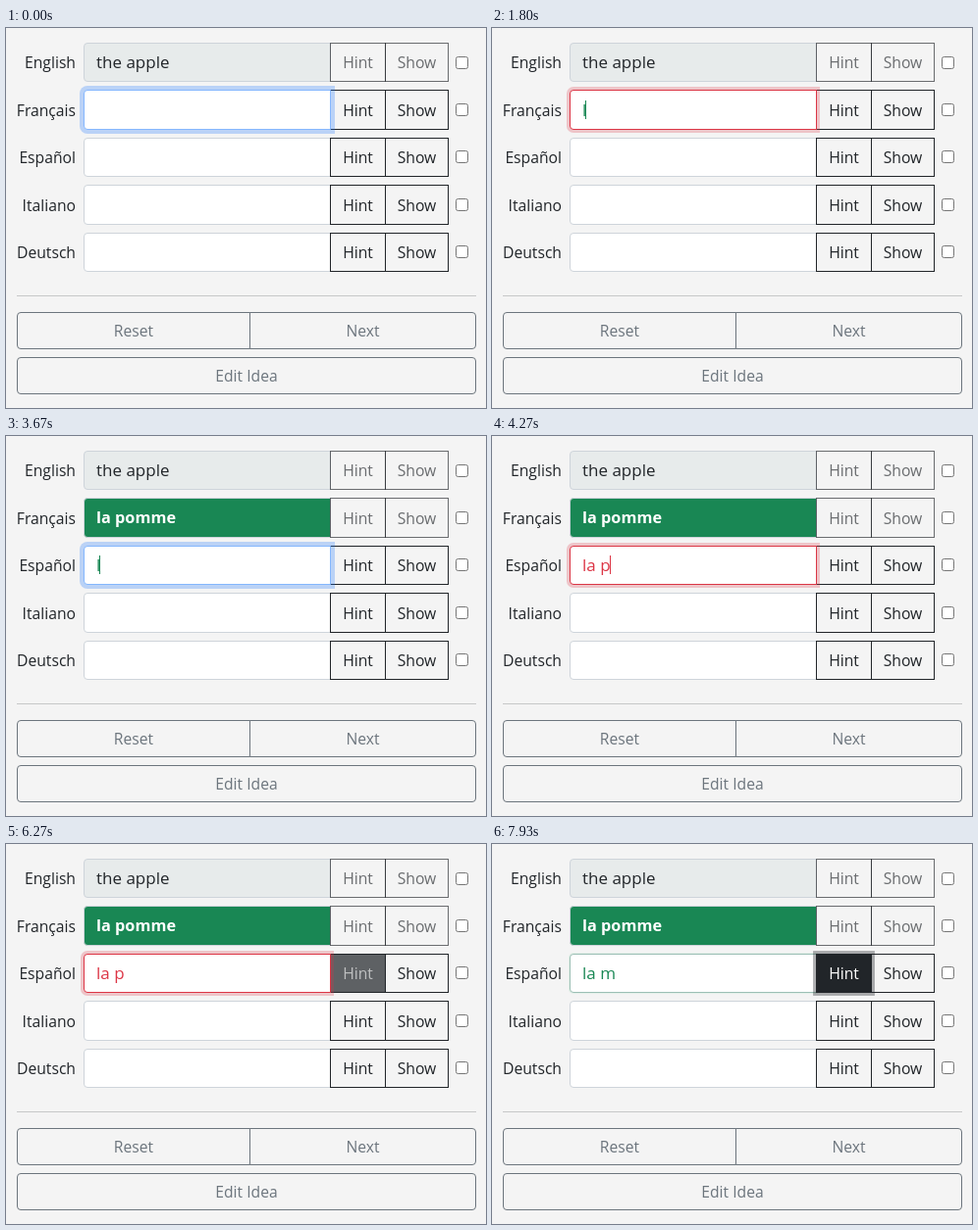
Recreate the animation shown at these times as an HTML page. Size 489 by 388 pixels, loop 8 s.

```html
<!DOCTYPE html>
<html lang="en">
<head>
<meta charset="utf-8">
<title>Vocabulary quiz</title>
<style>
html, body { margin: 0; width: 100%; height: 100%; overflow: hidden; background: #f4f4f4; }
body { position: relative; font: 15.7px "Open Sans", "Noto Sans", sans-serif; color: #212529; }
div { position: absolute; box-sizing: border-box; display: flex; align-items: center; white-space: pre; }
.label { justify-content: flex-end; }
.input { border: 1px solid #ced4da; border-radius: 4px 0 0 4px; background: #fff; padding: 0 0 1px 12px; font-size: 17px; }
.given { background: #e7ebeb; }
.done { background: #198754; color: #fff !important; font-weight: 700; font-size: 16.3px; }
.btn { border: 1px solid #212529; justify-content: center; z-index: 1; }
.off { opacity: .65; }
.grey { border-color: #6c757d; color: #6c757d; }
.check { border: 1px solid #767676; border-radius: 2.5px; background: #fff; }
.line { background: #c6c7c8; }
.caret { position: static; width: 1px; height: 19px; margin-left: -1px; background: currentColor; }
</style>
</head>
<body>
<script>
const LOOP = 8000, FADE = 150, BLINK = 600;
const DARK = [33, 37, 41], GREY = [108, 117, 125], WHITE = [255, 255, 255];
const GREEN = [25, 135, 84], RED = [220, 53, 69];

// Field looks: border, ring colour, ring width
const LOOKS = {
  idle:  { border: [206, 212, 218], width: 0 },
  blue:  { border: [134, 183, 254], ring: [13, 110, 253, .25], width: 4 },
  green: { border: GREEN, ring: [25, 175, 84, .27], width: 4 },
  red:   { border: RED, ring: [...RED, .25], width: 3 }
};

function box(cls, x, y, w, h, text = '') {
  const el = document.createElement('div');
  el.className = cls;
  el.style.cssText = `left:${x}px;top:${y}px;width:${w}px;height:${h}px`;
  el.textContent = text;
  document.body.append(el);
  return el;
}

const rows = ['English', 'Français', 'Español', 'Italiano', 'Deutsch'].map((name, i) => {
  const top = 15.45 + 48.4 * i, off = i ? '' : ' off';
  const y = Math.floor(top), h = Math.floor(top + 40.4) - y;
  box('label', 0, y, 71, h, name);
  const row = {
    input: box('input' + (i ? '' : ' given'), 79, y, 252, h, i ? '' : 'the apple'),
    hint: box('btn' + off, 330, y, 57, h, 'Hint'),
    show: box('btn' + off, 386, y, 65, h, 'Show')
  };
  box('check', 458, Math.floor(top + 13.6), 13, 13);
  return row;
});
box('line', 11, 273, 468, 1);
const reset = box('btn grey', 11, 290, 238, 38, 'Reset');
const next = box('btn grey', 248, 290, 231, 38, 'Next');
const edit = box('btn grey', 11, 336, 468, 38, 'Edit Idea');
reset.style.borderRadius = '4px 0 0 4px';
next.style.borderRadius = '0 4px 4px 0';
edit.style.borderRadius = '4px';

// keys and looks hold [start time, value]; focus holds the spans with a caret
const fields = [
  {
    row: rows[1], wrong: 'le', done: 3195,
    keys: [[-870, ''], [525, 'l'], [795, 'le'], [1795, 'l'], [2060, 'la'], [2460, 'la '], [2725, 'la p'],
           [2860, 'la po'], [3060, 'la pom'], [3125, 'la pomm'], [3195, 'la pomme']],
    looks: [[-999, 'blue'], [525, 'green'], [795, 'red'], [1795, 'green'], [3195, 'idle']],
    focus: [[0, 3195]]
  },
  {
    row: rows[2], wrong: 'la p', done: Infinity,
    keys: [[-999, ''], [3195, ''], [3660, 'l'], [3795, 'la'], [3925, 'la '], [4125, 'la p'], [6840, 'la m']],
    looks: [[-999, 'idle'], [3195, 'blue'], [3660, 'green'], [4125, 'red'], [6720, 'idle'], [6840, 'green'], [7835, 'idle']],
    focus: [[3195, 6720], [6840, 7835]]
  }
];
const hovers = [
  [edit, GREY, GREY, 5770, 5810], [next, GREY, GREY, 5810, 5850],
  [rows[4].hint, DARK, DARK, 5918, 6070], [rows[3].hint, DARK, DARK, 6070, 6170],
  [rows[2].hint, DARK, DARK, 6170, LOOP]
];
const presses = [[6720, 6840], [7835, LOOP]];

const clamp = v => Math.max(0, Math.min(1, v));
const ease = p => p * p * (3 - 2 * p);
const mix = (a, b, p) => a.map((v, i) => v + (b[i] - v) * p);
const rgba = c => `rgba(${c.join()})`;
const clear = c => c ? [...c.slice(0, 3), 0] : [0, 0, 0, 0];
const inside = (t, spans) => spans.some(([a, b]) => t >= a && t < b);
const lastIndex = (list, t) => list.filter(([start]) => start <= t).length - 1;

// Fades in from a and back out from b
function pulse(t, a, b) {
  const p = clamp((Math.min(t, b) - a) / FADE);
  return ease(clamp(p - Math.max(0, t - b) / FADE));
}

function drawField({ row, wrong, done, keys, looks, focus }, t) {
  const { input, hint, show } = row;
  const [since, text] = keys[lastIndex(keys, t)];
  const i = lastIndex(looks, t);
  const to = LOOKS[looks[i][1]], from = LOOKS[looks[Math.max(0, i - 1)][1]];
  const p = ease(clamp((t - looks[i][0]) / FADE));
  const ring = mix(from.ring || clear(to.ring), to.ring || clear(from.ring), p);
  const width = from.width + (to.width - from.width) * p;
  const focused = inside(t, focus);

  // The red answer of the first field is a wrong word, not a step of the right one
  input.textContent = text;
  input.classList.toggle('done', t >= done);
  input.style.color = rgba(text === wrong ? RED : GREEN);
  input.style.borderColor = rgba(mix(from.border, to.border, p));
  input.style.boxShadow = `0 0 0 ${width}px ${rgba(ring)}`;
  input.style.zIndex = focused ? 2 : 0;
  for (const b of [hint, show]) b.classList.toggle('off', t >= done);

  if (focused && Math.floor((t - since) / BLINK) % 2 === 0) {
    const caret = document.createElement('div');
    caret.className = 'caret';
    input.append(caret);
  }
}

function draw(t) {
  fields.forEach(f => drawField(f, t));
  for (const [el, fill, ink, a, b] of hovers) {
    const p = pulse(t, a, b);
    el.style.background = rgba([...fill, p]);
    el.style.color = rgba(mix(ink, WHITE, p));
  }
  const press = Math.max(...presses.map(([a, b]) => pulse(t, a, b)));
  const hint = rows[2].hint;
  hint.style.boxShadow = `0 0 0 ${4 * press}px ${rgba([...DARK, .5 * press])}`;
  hint.style.zIndex = inside(t, presses) ? 3 : 1;
}

// The picture advances 15 times per second
const start = performance.now();
function tick() {
  const t = (performance.now() - start) % LOOP;
  draw(Math.floor((t + 4) * 3 / 200) * 200 / 3 % LOOP);
  requestAnimationFrame(tick);
}
tick();
</script>
</body>
</html>
```
